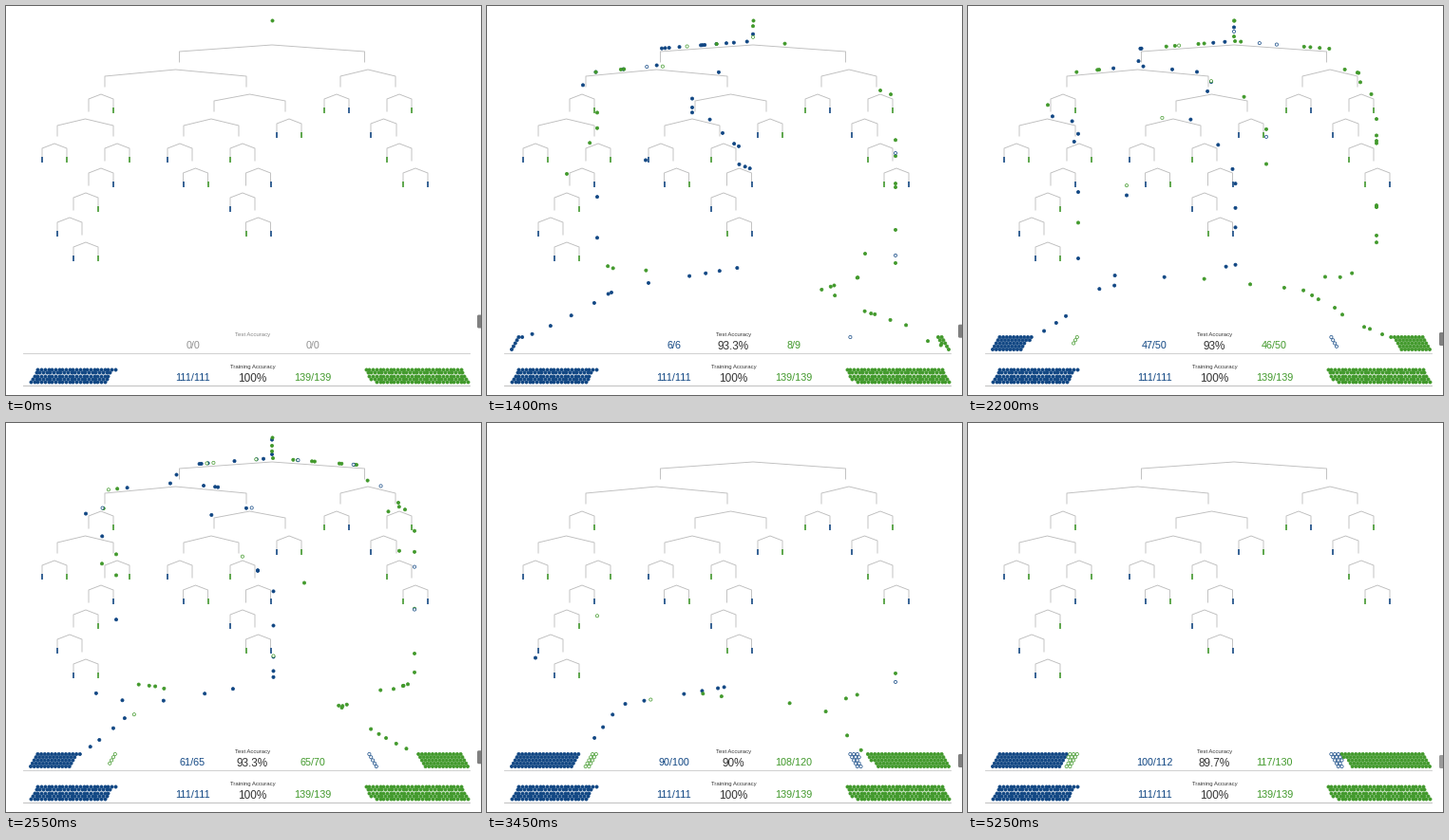
A matplotlib script for the animation above (5.3 s loop, 500 by 410 pixels).

```python
import numpy as np
import matplotlib.pyplot as plt
from matplotlib.animation import FuncAnimation
from matplotlib.collections import LineCollection
from matplotlib.patches import FancyBboxPatch

W, H, DPI = 500, 410, 80
STEP, FRAMES = 50, 106
PX = 72 / DPI
BLUE, GREEN, INK = "#104683", "#41992b", "#333333"
COLORS = {"b": BLUE, "g": GREEN}
LEFT, RIGHT = -1, 1

# apex x, apex y, half width, parent, side, leaf colours (left, right)
TREE = [
    (280, 41, 97.5, None, 0, "  "),
    (178.5, 67, 74.5, 0, LEFT, "  "),
    (381, 67, 29, 0, RIGHT, "  "),
    (100, 93, 13, 1, LEFT, " g"),
    (256.5, 93, 37.5, 1, RIGHT, "  "),
    (348, 93, 13, 2, LEFT, "gb"),
    (414, 93, 13, 2, RIGHT, " g"),
    (83.5, 119, 29.5, 3, LEFT, "  "),
    (216, 119, 29, 4, LEFT, "  "),
    (298, 119, 13, 4, RIGHT, "bg"),
    (397.5, 119, 13.5, 6, LEFT, "b "),
    (51, 145, 13, 7, LEFT, "bg"),
    (117, 145, 13, 7, RIGHT, " g"),
    (183, 145, 13, 8, LEFT, "b "),
    (249, 145, 13, 8, RIGHT, "g "),
    (414, 145, 13, 10, RIGHT, "g "),
    (100, 171, 13, 12, LEFT, " b"),
    (199.5, 171, 13, 13, RIGHT, "bg"),
    (265.5, 171, 13, 14, RIGHT, " b"),
    (431, 171, 13, 15, RIGHT, "gb"),
    (84, 197, 13, 16, LEFT, " g"),
    (249, 197, 13, 18, LEFT, "b "),
    (67, 223, 13, 20, LEFT, "b "),
    (265.5, 223, 13, 21, RIGHT, "gb"),
    (84, 249, 13, 22, RIGHT, "bg"),
]

# leaves that receive balls, with their share
EXITS = {
    LEFT: ([(18, RIGHT), (16, RIGHT), (13, LEFT), (9, LEFT), (22, LEFT), (23, RIGHT)],
           [0.55, 0.25, 0.08, 0.05, 0.04, 0.03]),
    RIGHT: ([(6, RIGHT), (3, RIGHT), (20, RIGHT), (9, RIGHT), (15, LEFT), (19, LEFT)],
            [0.62, 0.14, 0.08, 0.05, 0.05, 0.06]),
}
HUBS = {LEFT: (140, 297), RIGHT: (352, 299)}

# arrivals over time for each pile: (side, correct) -> running totals
TIMES = [1250, 1750, 2200, 2900, 3450, 3800]
TOTALS = {
    (LEFT, True): [0, 21, 47, 75, 90, 100],
    (LEFT, False): [0, 0, 3, 6, 10, 12],
    (RIGHT, True): [0, 29, 46, 84, 108, 117],
    (RIGHT, False): [0, 3, 4, 6, 12, 13],
}
FIRST_LAUNCH, LAST_LAUNCH = 560, 2650
GAP, ROW, SLANT = 3.7, 3.25, 1.85
TEST_Y, TRAIN_Y = 349, 383


def drop(half):
    return 7 if half > 20 else 5


def slot(side, k, top, correct=True):
    """Place of ball k in a slanted pile; wrong ones fill from the inner end."""
    col, row = divmod(k, 5)
    if not correct:
        col = (22 if side == LEFT else 26) - col
    inward = GAP * col - SLANT * row
    x = 33.4 + inward if side == LEFT else 478.6 - inward
    return x, top + ROW * row


def route(node, side, goal, hub):
    """Points from the source through the tree to a pile slot."""
    back = []
    while node is not None:
        ax, ay, half, parent, own_side, _ = TREE[node]
        x = ax + side * (half + 3)
        back += [(x, ay + 19), (x, ay + drop(half) - 3), (ax, ay - 4)]
        node, side = parent, own_side
    points = [(280, 15)] + back[::-1]
    points += [(points[-1][0], 273), hub, goal]
    return np.array(points, float)


class Ball:
    def __init__(self, side, correct, k, rng):
        totals = TOTALS[side, correct]
        self.arrive = np.interp(k + 0.9, totals, TIMES)
        exits, share = EXITS[side]
        node, leaf_side = exits[rng.choice(len(exits), p=share)]
        goal = slot(side, k, TEST_Y, correct)
        self.path = route(node, leaf_side, goal, HUBS[side])
        steps = np.hypot(*np.diff(self.path, axis=0).T)
        self.along = np.concatenate([[0], np.cumsum(steps)])
        self.color = BLUE if (side == LEFT) == correct else GREEN
        self.fill = self.color if correct else "white"
        self.order = self.arrive - 0.9 * self.along[-1] + rng.uniform(-130, 130)

    def at(self, t):
        if t < self.launch:
            return np.nan, np.nan
        s = min(1, (t - self.launch) / (self.arrive - self.launch)) * self.along[-1]
        return (np.interp(s, self.along, self.path[:, 0]),
                np.interp(s, self.along, self.path[:, 1]))


def make_balls():
    rng = np.random.default_rng(7)
    balls = [Ball(side, correct, k, rng)
             for (side, correct), totals in TOTALS.items()
             for k in range(totals[-1])]
    ranked = sorted(balls, key=lambda b: b.order)
    for ball, t in zip(ranked, np.linspace(FIRST_LAUNCH, LAST_LAUNCH, len(balls))):
        ball.launch = min(t, ball.arrive - 350)
    return balls


def draw_tree(ax):
    branches, leaves, tints = [], [], []
    for x, y, half, _, _, kinds in TREE:
        l, r, arm = x - half, x + half, y + drop(half)
        branches.append([(l, y + 18.5), (l, arm), (x, y), (r, arm), (r, y + 18.5)])
        for end, kind in zip((l, r), kinds):
            if kind in COLORS:
                leaves.append([(end, y + 14), (end, y + 20)])
                tints.append(COLORS[kind])
    ax.add_collection(LineCollection(branches, colors="#bdbdbd", linewidths=0.9 * PX))
    ax.add_collection(LineCollection(leaves, colors=tints, linewidths=1.6 * PX,
                                     capstyle="butt", zorder=3))


def label(ax, x, y, text, size, color):
    return ax.text(x, y, text, fontsize=size * PX, color=color,
                   ha="center", va="center_baseline")


def dots(ax, points, fill, edge):
    return ax.scatter(*np.transpose(points), s=(3.2 * PX) ** 2, c=fill,
                      edgecolors=edge, linewidths=0.7 * PX, zorder=4)


def percent(right, total):
    return f"{100 * right / total:.1f}".removesuffix(".0") + "%" if total else ""


plt.rcParams["font.family"] = "Liberation Sans"
fig = plt.figure(figsize=(W / DPI, H / DPI), dpi=DPI, facecolor="white")
ax = fig.add_axes([0, 0, 1, 1])
ax.set_xlim(0, W)
ax.set_ylim(H, 0)
ax.axis("off")

draw_tree(ax)
for y, shade in ((365.5, "#cccccc"), (399.5, "#bbbbbb")):
    ax.plot([18, 488], [y, y], color=shade, lw=0.9 * PX)

for side, count, color in ((LEFT, 111, BLUE), (RIGHT, 139, GREEN)):
    dots(ax, [slot(side, k, TRAIN_Y) for k in range(count)], color, color)
label(ax, 259.5, 380, "Training Accuracy", 6, INK)
label(ax, 259, 391, "100%", 11.8, INK)
label(ax, 196.5, 391, "111/111", 10.7, BLUE)
label(ax, 322.5, 391, "139/139", 10.7, GREEN)

test_title = label(ax, 259.5, 346, "Test Accuracy", 6, INK)
test_score = label(ax, 259, 357, "", 11.8, INK)
test_left = label(ax, 196.5, 357, "0/0", 10.7, BLUE)
test_right = label(ax, 322.5, 357, "0/0", 10.7, GREEN)

balls = make_balls()
moving = dots(ax, [(-20, -20)] * len(balls), [b.fill for b in balls],
              [b.color for b in balls])
source = dots(ax, [(280, 15)], GREEN, GREEN)
thumb = ax.add_patch(FancyBboxPatch((497.5, 327), 4, 11, lw=0, fc="#808080",
                                    boxstyle="round,pad=1.5,rounding_size=1.5"))


def draw(i):
    t = i * STEP
    arrived = {key: int(np.interp(t, TIMES, totals) + 0.1)
               for key, totals in TOTALS.items()}
    hits = {s: arrived[s, True] for s in (LEFT, RIGHT)}
    sums = {s: hits[s] + arrived[s, False] for s in (LEFT, RIGHT)}
    test_left.set_text(f"{hits[LEFT]}/{sums[LEFT]}")
    test_right.set_text(f"{hits[RIGHT]}/{sums[RIGHT]}")
    test_score.set_text(percent(sum(hits.values()), sum(sums.values())))

    fade = np.interp(t, [0, 350], [0, 1])
    test_title.set_alpha(0.6 + 0.4 * fade)
    for text, color in ((test_left, BLUE), (test_right, GREEN)):
        text.set_color(color if fade > 0.5 else "#777777")
        text.set_alpha(0.8 + 0.2 * fade)

    moving.set_offsets(np.array([b.at(t) for b in balls]))
    source.set_visible(t < LAST_LAUNCH)
    thumb.set_y(np.interp(t, [500, 1000, 1750, 2200, 2900, 3450, 4600],
                          [327, 334, 340, 345.5, 348, 350.5, 351.5]))
    thumb.set_facecolor("#9a9a9a" if t >= 5200 else "#808080")
    return moving, source, thumb


anim = FuncAnimation(fig, draw, frames=FRAMES, interval=STEP, repeat=True)
plt.show()
```
